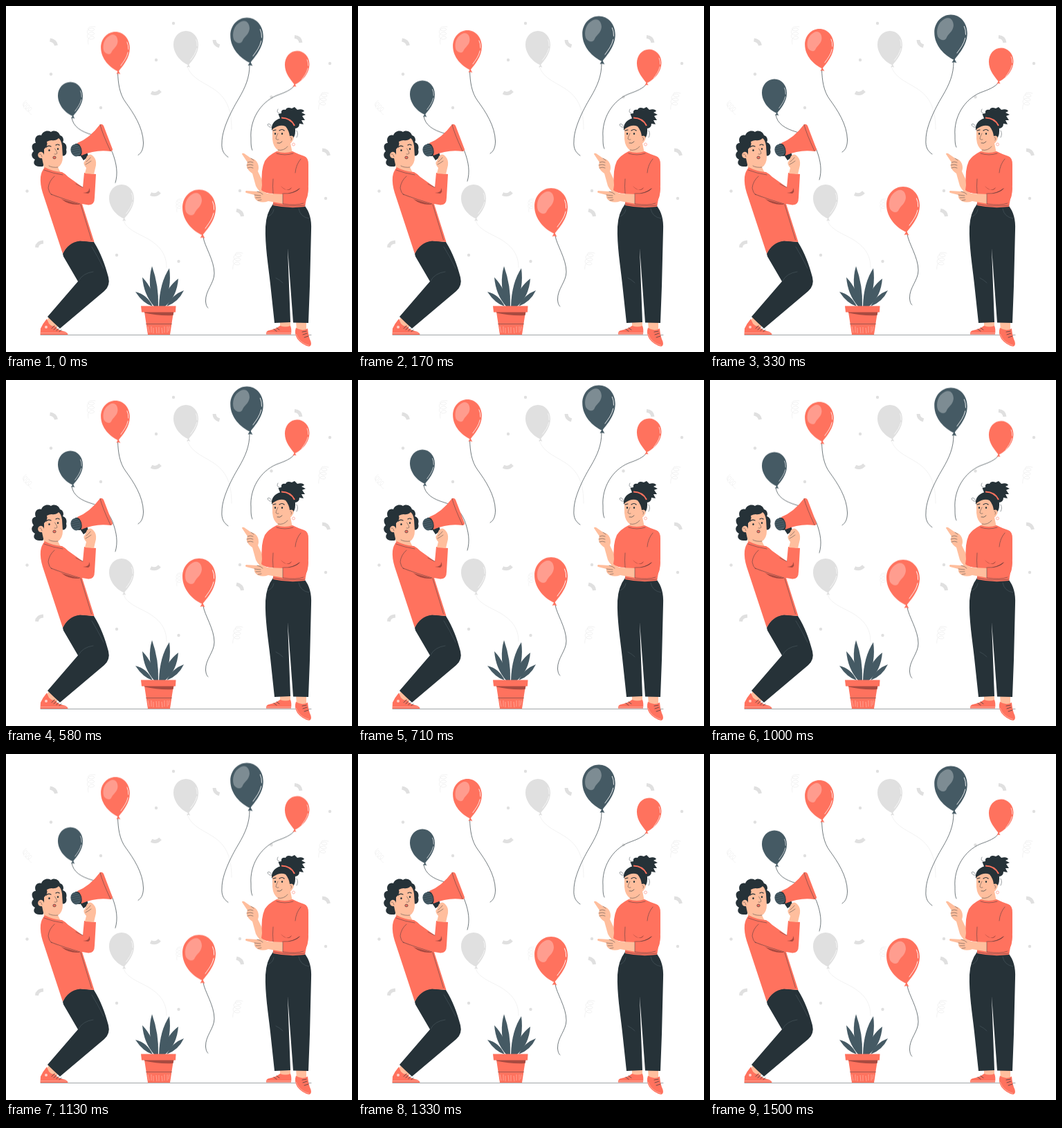
An HTML page that plays this animation: 500x500 px, repeating every 1.54 s.

```html
<!DOCTYPE html>
<html lang="en">
<head>
<meta charset="utf-8">
<title>Balloons</title>
<style>
  html, body { margin: 0; width: 100%; height: 100%; overflow: hidden; background: #fff; }
  svg { display: block; width: 100%; height: 100%; }
  .float { animation: float 1540ms linear -50ms infinite; }
  @keyframes float { 50% { transform: translateY(-10px); } }
  .red { fill: #ff725e; color: #ff725e; }
  .slate { fill: #455a64; color: #455a64; }
  .dark { fill: #263238; }
  .skin { fill: #ffbe9d; }
  .pale { fill: #e0e0e0; color: #e0e0e0; }
  .shade { fill: #a84a40; }
  .line { fill: none; stroke: #263238; stroke-width: .65; stroke-linecap: round; stroke-linejoin: round; }
  .thin { stroke-width: .45; }
  .brow { stroke-width: 1.2; }
  .faint { stroke: #ebebeb; }
  .seam { stroke: #56656c; }
  .bits { fill: none; stroke: #e0e0e0; stroke-width: 5; }
  .glint { fill: none; stroke: #fff; stroke-width: .9; stroke-linecap: round; }
  .sole { fill: none; stroke: #ffd0c7; stroke-width: .5; }
</style>
</head>
<body>
<svg viewBox="0 0 500 500">
  <defs>
    <g id="body">
      <path fill="currentColor" d="M0 0C14 0 24 12 24 27C24 44 12 57 5 66C-9 60-24 45-24 26C-24 11-13 0 0 0Z"/>
      <path fill="currentColor" d="M5 64L1.500 70Q5 68.500 8.500 70.500Z"/>
    </g>
    <path id="glint" class="glint" d="M21 34C19 43 14 49 9 56M19.500 17Q22 22 21.700 29"/>
    <g id="balloon"><use href="#body"/><use href="#glint"/></g>
    <g id="shiny">
      <use href="#body"/>
      <path fill="#fff" opacity=".3" d="M-9 6C-1 2 4 8 4 16C3 25-3 27-6 33C-8 39-15 38-19 32C-22 23-19 11-9 6Z"/>
      <use href="#glint"/>
    </g>
    <path id="curl" class="line faint" d="M6-12C-6-14-7-6 0-6S5-11 0-10C-8-8-7 0 0 0S5-5 0-4C-8-2-7 6 0 6S5 1 0 2C-5 4-5 8-4 13"/>
  </defs>

  <!-- confetti -->
  <g class="pale">
    <circle cx="242" cy="25" r="2.200"/><circle cx="217" cy="78" r="2.200"/>
    <circle cx="137" cy="147" r="2.200"/><circle cx="65" cy="98.500" r="2.200"/>
    <circle cx="30.500" cy="267.500" r="2.200"/><circle cx="160" cy="360" r="2.200"/>
    <circle cx="249.500" cy="369" r="2.200"/><circle cx="383.500" cy="131.500" r="2.200"/>
    <circle cx="468" cy="83" r="2.200"/><circle cx="462" cy="278" r="2.200"/>
    <circle cx="338" cy="267" r="2.200"/>
  </g>
  <path class="bits" d="M63.500 49Q71 50 72.500 57M210 125Q217 129 223 122.500M301 49Q301 56 308.500 58M417 44.500Q425 45 426 53M457 208Q465 208.500 466.500 216M209 271.500Q216 275 222 269M333 295Q341 297 341.500 304M44.500 349Q45 341.500 54 341"/>
  <use href="#curl" x="123" y="42"/>
  <use href="#curl" transform="translate(32 147) rotate(-42) scale(.8)"/>
  <use href="#curl" transform="translate(458 137) rotate(10)"/>
  <use href="#curl" transform="translate(334 368) rotate(10)"/>
  <use href="#curl" transform="translate(250 288) scale(.75)"/>

  <!-- resting balloons -->
  <g class="pale">
    <path class="line faint" d="M262 87C267 105 288 111 303 122C319 134 326 150 326 178M170 309C172 322 190 328 206 337C224 348 232 360 232 378"/>
    <use href="#balloon" transform="translate(260 36) scale(.75)"/>
    <use href="#balloon" transform="translate(167 258) scale(.75)"/>
  </g>

  <!-- floating balloons -->
  <g class="float">
    <path class="line" d="M161.500 97C162 112 164 128 173 140C184 155 198 176 198.500 198C198.500 207 196 213 191 216"/>
    <path class="line" d="M95 162C97 175 108 182 125 187C141 192 148 199 154 213C160 229 162 243 158 256"/>
    <path class="line" d="M352 86C352 104 346 118 336 135C324 155 312 180 312 198C311 209 315 215 321 219"/>
    <path class="line" d="M417 115C413 122 402 126 391 130C367 140 352 166 354 192C354 200 354 205 356 209"/>
    <path class="line" d="M285 335C287 348 301 368 301 387C301 401 288 412 288.500 427C289 433 290 435 292 437"/>
    <use href="#shiny" class="red" transform="translate(158 38) scale(.87)"/>
    <use href="#balloon" class="slate" transform="translate(93 110.500) scale(.75)"/>
    <use href="#shiny" class="slate" transform="translate(348 17.500) scale(.99)"/>
    <g class="red" transform="translate(420.700 65.500) scale(.74)">
      <use href="#body" transform="scale(-1 1)"/><use href="#glint"/>
    </g>
    <use href="#shiny" class="red" transform="translate(279 266)"/>
  </g>

  <path class="line thin" d="M50 475.400H441"/>

  <!-- plant -->
  <g class="slate">
    <path d="M212 434Q198 430 187 413Q204 417 212 434Z"/>
    <path d="M232 434Q240 417 257 411Q249 428 232 434Z"/>
    <path d="M214 434Q199 417 197 392Q214 410 217 434Z"/>
    <path d="M225 434Q231 407 249 394Q247 420 230 434Z"/>
    <path d="M215 434Q203 402 211 376Q221 404 220 434Z"/>
    <path d="M221 434Q222 400 236 379Q240 408 227 434Z"/>
  </g>
  <path class="red" d="M200 442H242L237 475H205Z"/>
  <path class="shade" d="M199.500 442H242.500L241.500 447Q220 448 200.500 443.500Z"/>
  <path class="red" d="M195 433.500H245.500L245 442.500H196Z"/>
  <path class="line thin" d="M202.500 459.500H239.500"/>
  <path class="sole" d="M205 463L207 472M210 463V472M213 465V473M217 464L218 473M221 464V473M225 465L226 473M229 463V472M233 463V472M236 463L235 470"/>

  <!-- man: legs -->
  <path class="skin" d="M62 449L75 462L70 469L57 460Z"/>
  <path class="red" d="M59 452Q53 459 50 466L49.500 475H89.500Q89 471 83 470Q74 468 70 462Q67 464 62 459Z"/>
  <path class="sole" d="M50 472.500H88"/>
  <circle cx="58" cy="464" r="2" fill="#ffd0c7"/>
  <path class="line" d="M66 466L70 462M69 468L73 464M73 469.500L76 466M77 470.500L80 468"/>
  <path class="dark" d="M82 358C87 347 95 340 107 339L127 341C137 357 143 373 148 392Q151 404 142 412L78 466Q68 457 60 449L104 398L83 362Z"/>
  <path class="line thin seam" d="M105 397Q111 386 126 384M124 348Q132 361 141 379"/>

  <!-- man: head -->
  <path class="dark" d="M53 232C41 233 38 227 42 222C36 219 36 213 40 210C36 205 37 198 43 198C40 191 45 185 51 187C53 181 60 179 65 182C71 178 77 183 78 187C83 188 84 194 82 197C88 199 88 204 87 208C89 214 84 218 80 216L70 208Z"/>
  <path class="skin" d="M55 207Q61 202 59 196Q63 194 66 194Q72 195 76 191Q80 194 81 202L82 218Q82 229 75 233L79 241Q65 239 55 235L54 229L52 220C46 221 44 213 49 211Q53 210 55 215Z"/>
  <path class="line thin" d="M62 231Q67 234 75 233M48 214Q51 213 52 218M70.500 206Q74 211 74 213Q72 215 70 214"/>
  <path class="line brow" d="M58 204Q61 201 65 203M72 201Q75 199 77 201"/>
  <ellipse class="dark" cx="62.500" cy="208.500" rx="1.200" ry="1.600"/>
  <ellipse class="dark" cx="75" cy="206.500" rx="1.100" ry="1.600"/>
  <ellipse cx="70" cy="219" rx="2.200" ry="1.900" fill="#ff725e" stroke="#263238" stroke-width=".6"/>

  <!-- man: shirt -->
  <path class="red" d="M56 233Q51 239 50 247Q49 257 53 270L82 358C87 348 95 340.500 107 339.500L127.500 341L110 286L119 287.500Q128 288 128 277L130 243L113 241L111 262L90 247Q85 242 81 240Q67 239 56 233Z"/>
  <path class="line thin" d="M55 237Q68 242 82 244M70 246Q62 253 61 263Q62 270 66 273M108 287L123.500 338M65 272Q86 280 107 286M111 262Q106 260 101 257"/>
  <path class="shade" d="M64 271Q78 280 107 286.500L105 287Q91 288 80 279Z"/>
  <path class="shade" d="M119 271Q123 268 120 263Q121 270 111 270Z"/>

  <!-- megaphone -->
  <path class="dark" d="M106 214L117 210L119 218L112 223Z"/>
  <path class="red" d="M103 198Q121 191 136 171Q139 170 141 173L154 207Q154 210 151 210Q130 207 109 216Z"/>
  <path class="line thin" d="M136 171.500Q139 184 151 209.500"/>
  <path class="dark" d="M100 199Q106 197 109 206Q111 214 107 217L101 217Z"/>
  <ellipse cx="101" cy="208.500" rx="7.500" ry="9" class="slate" transform="rotate(-18 101 208.500)"/>
  <path class="line thin" d="M95 205L105 202M94 208L107 205M95 211L107 208M97 214L107 211"/>

  <!-- man: hand -->
  <path class="skin" d="M114 242L116 234Q110 227 114 224L117 217Q122 212 126 217Q131 222 130 230L127 243Z"/>
  <path class="line thin" d="M116 225Q120 222 122 219M115 229Q119 227 123 224"/>

  <!-- woman: feet -->
  <path class="skin" d="M396 455H411L411 467H396ZM419 455H434L434 470H420Z"/>
  <path class="red" d="M396 462Q390 467 379 469Q375 471 376 474.500H412Q413 467 411 462Q404 465 396 462Z"/>
  <path class="sole" d="M376 472.500H412"/>
  <path class="red" d="M419 465Q416 473 421 481Q428 490 438 492Q442 491 440.500 485Q437 478 436 466Q428 471 419 465Z"/>
  <path class="sole" d="M419 474Q424 487 438 490.500"/>
  <path class="line" d="M391 465L395 468M387 467L391 470M428 471L434 470M429 475L435 473M431 479L437 477"/>

  <!-- woman: trousers -->
  <path class="dark" d="M386 286L432 289C438 297 442 308 441 324L439 405L437 458L415 457.500L407 350L411 457L388 458L382 402C379 375 374 345 375 319Q376 299 386 286Z"/>
  <path class="line thin seam" d="M423 293Q425 305 438 307M387 294Q386 301 379 304M390 393Q396 396 400 400"/>

  <!-- woman: head -->
  <path class="dark" d="M397 165L393.500 156L398 155Q397 149 404 150Q406 145 413 148L417 146L421 150Q429 148 431 152L427 154L433 157L428 159L432 165L427 165L430 171L424 170Q424 176 418 177L408 169Z"/>
  <path class="dark" d="M384 179C383 169 390 163 401 161C412 162 419 171 418 181Q418 189 413 193L406 188Z"/>
  <path fill="none" stroke="#ff725e" stroke-width="2" d="M398 161.500Q412 162 417 173"/>
  <path class="skin" d="M385 178Q396 170 404 174Q409 180 410 188C414 186 418 190 414 195Q412 199 411 198L414 213Q403 217 391 212L393 208Q386 204 385 192Z"/>
  <path class="line thin" d="M393 208Q401 210 407 203"/>
  <path class="line brow" d="M386 180L390 179M395 180Q399 177 402 180"/>
  <ellipse class="dark" cx="389" cy="184.500" rx="1.100" ry="1.500"/>
  <ellipse class="dark" cx="399" cy="184.500" rx="1.100" ry="1.500"/>
  <path class="line thin" d="M393 184Q390 190 390 192Q392 194 394 193M411 190Q414 190 412 194"/>
  <path class="line" d="M392 198Q396 199.500 399 196"/>
  <circle cx="415.500" cy="200" r="2" fill="#fff" stroke="#ff725e" stroke-width=".5"/>
  <path class="line thin" d="M384 175Q379 176 378 171Q381 169 383 173M395 155Q390 154 393 149M420 180Q423 185 420 190"/>

  <!-- woman: raised arm -->
  <path class="skin" d="M373 271Q366 270 361 260L356 242Q350 238 348 233Q347 229 349 226L341 214Q341 212 344 213L354 220Q361 221 364 228Q366 234 364 239L374 260Z"/>
  <path class="line thin" d="M349 226Q353 224 357 226M348 230Q353 228 357 230M349 234Q353 232 357 234M354 220L358 223"/>

  <!-- woman: jumper -->
  <path class="red" d="M391 210Q379 216 374 224Q368 237 370 259L369 266Q374 271 386 271L386 288Q408 293 432 290L434 279Q437 274 437 258V229Q437 219 431 217Q422 214 414 210Q403 214 391 210Z"/>
  <path class="line thin" d="M391 213Q403 217 415 213M386 250Q385 260 386 271M426 221Q419 229 418 241M386 286Q408 291 432 288"/>
  <path class="shade" d="M397 260Q405 270 413 262Q409 271 397 260ZM401 272Q413 271 425 263Q420 271 408 273Z"/>

  <!-- woman: pointing arm -->
  <path class="skin" d="M402 272L378 271Q371 267 363 268L347 267Q345 268.500 347 270L359 273Q358 279 364 282Q371 285 379 282L402 286Z"/>
  <path class="line thin" d="M359 273L368 274M361 277L368 277M364 281L369 280M363 268Q368 269 371 272"/>
  <path class="red" d="M400 271Q416 272 425 264L437 262Q436 277 432 283Q428 288 400 286Z"/>
  <path class="line thin" d="M400 271V286Q420 289 430 285M401 271Q416 272 424 264"/>
</svg>
</body>
</html>
```
